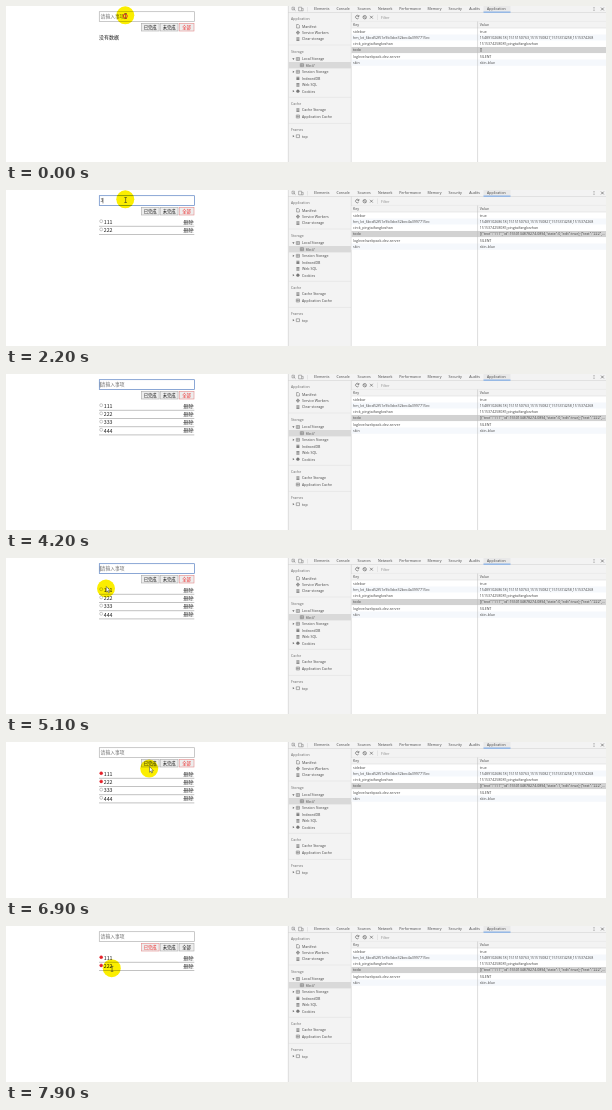
Recreate the animation shown at these times as an HTML page. Size 600 by 156 pixels, loop 8000 ms.

```html
<!DOCTYPE html>
<html lang="zh">
<head>
<meta charset="utf-8">
<title>Todo list with local storage</title>
<style>
  html, body { margin: 0; width: 100%; height: 100%; overflow: hidden; background: #fff; }
  svg { display: block; width: 100%; height: 100%; }
  text { white-space: pre; }
  .ui { font-family: "Open Sans", "Noto Sans", sans-serif; font-size: 3.6px; fill: #444; }
  .page { font-family: "Noto Sans CJK SC", "Noto Sans CJK", sans-serif; font-size: 5px; fill: #222; }
  .glow { mix-blend-mode: multiply; }
</style>
</head>
<body>
<svg id="stage" viewBox="0 0 600 156"></svg>
<script>
const NS = "http://www.w3.org/2000/svg";
const LOOP = 8000, STEP = 100;
const stage = document.getElementById("stage");

function add(tag, attrs, parent = stage, content) {
  const el = document.createElementNS(NS, tag);
  set(el, attrs);
  if (content !== undefined) el.textContent = content;
  return parent.appendChild(el);
}
function set(el, attrs) {
  for (const k in attrs) el.setAttribute(k, attrs[k]);
}
const rect = (x, y, width, height, fill, more = {}, parent = stage) =>
  add("rect", { x, y, width, height, fill, ...more }, parent);
const path = (d, stroke, width = 0.5, parent = stage) =>
  add("path", { d, stroke, "stroke-width": width, fill: "none" }, parent);
const ui = (x, y, s, more = {}) => add("text", { class: "ui", x, y, ...more }, stage, s);
const page = (x, y, s, more = {}, parent = stage) =>
  add("text", { class: "page", x, y, ...more }, parent, s);
const show = (el, on) => el.setAttribute("visibility", on ? "inherit" : "hidden");

rect(0, 0, 600, 156, "#fff");

// Developer tools: tab bar and toolbar
rect(282, 0, 318, 15.5, "#f3f3f3");
rect(282, 6.5, 63, 149.5, "#f3f3f3");
path("M282.3 0V156M345.3 6.5V156", "#c4c4c4");
path("M282 6.5H600M345 15.4H600", "#cfcfcf");
path("M286 1.2h2.4v2.6h-2.4zM287.2 2.4l2.3 2.3M292.6 1.2h3v3.6h-3zM295.6 2.4h1.6v2.4h-1.6", "#777");
path("M301.5 1V5.5", "#ccc", 0.4);
rect(477.5, 0, 27, 6.3, "#e9e9e9");
rect(477.5, 5.7, 27, 0.8, "#4d90e8");
[["Elements", 308], ["Console", 330.4], ["Sources", 351.5], ["Network", 372], ["Performance", 393.2],
 ["Memory", 421.5], ["Security", 442.5], ["Audits", 463.3], ["Application", 481]]
  .forEach(([s, x]) => ui(x, 4.1, s));
path("M588 1.1v.8M588 2.6v.8M588 4.1v.8M595 1.6l2.8 2.8M597.8 1.6l-2.8 2.8", "#666", 0.7);
path("M352.6 10a1.7 1.7 0 1 0 .2 1.8M352.9 9v1.5h-1.5", "#555", 0.6);
path("M357 11.2a1.7 1.7 0 1 0 3.4 0a1.7 1.7 0 1 0-3.4 0M357.6 10l2.2 2.4", "#555", 0.6);
path("M364 9.8l2.8 2.8M366.8 9.8l-2.8 2.8", "#555", 0.6);
path("M371.5 8.5V14", "#ccc", 0.4);
ui(375, 12.6, "Filter", { style: "fill:#888" });

// Sidebar
rect(282.6, 56, 62.4, 6.4, "#d9d9d9");
path("M282.6 39H345M282.6 91.3H345M282.6 117.4H345", "#d4d4d4", 0.4);
const heading = (y, s) => ui(285, y + 1.3, s, { style: "fill:#6a6a6a" });
heading(13, "Application");
heading(45.5, "Storage");
heading(97.5, "Cache");
heading(123.5, "Frames");
const cylinder = y => {
  for (const dy of [-1.5, -0.3, 0.9]) rect(290.4, y + dy, 3, 0.8, "#666");
};
const grid = y => path(`M290.3 ${y - 1.5}h3.2v3h-3.2zM290.3 ${y}h3.2M291.9 ${y - 1.5}v3`, "#666", 0.45);
const doc = y => path(`M290.6 ${y - 1.7}h1.8l1 1v2.5h-2.8z`, "#666", 0.5);
const gear = y => path(`M290.6 ${y}a1.3 1.3 0 1 0 2.6 0a1.3 1.3 0 1 0-2.6 0M290 ${y}h3.8M291.9 ${y - 1.9}v3.8`, "#666", 0.5);
const cookie = y => add("circle", { cx: 291.9, cy: y, r: 1.6, fill: "#777" });
const openMark = y => add("path", { d: `M286.3 ${y - 0.7}h2.2l-1.1 1.6z`, fill: "#666" });
const closedMark = y => add("path", { d: `M286.8 ${y - 1.1}v2.2l1.6-1.1z`, fill: "#666" });
const frameIcon = y => path(`M290.3 ${y - 1.4}h3.2v2.8h-3.2z`, "#666", 0.5);
[["Manifest", 20.2, doc], ["Service Workers", 26.6, gear], ["Clear storage", 33, cylinder],
 ["Local Storage", 53, grid, openMark], ["Session Storage", 65.8, grid, closedMark],
 ["IndexedDB", 72.3, cylinder], ["Web SQL", 78.8, cylinder], ["Cookies", 85.2, cookie, closedMark],
 ["Cache Storage", 104, cylinder], ["Application Cache", 110.5, grid], ["top", 130.2, frameIcon, closedMark]]
  .forEach(([s, y, icon, mark]) => {
    icon(y);
    if (mark) mark(y);
    ui(296, y + 1.3, s);
  });
grid(59.2).setAttribute("transform", "translate(4 0)");
ui(300, 60.5, "file://");

// Storage table
rect(345.6, 15.6, 254.4, 6.4, "#f3f3f3");
ui(347, 20.3, "Key");
ui(473.8, 20.3, "Value");
const pairs = [
  ["sidebar", "true"],
  ["hm_lvt_6bcd52f51e9b3dce32bec4a3997715ec", "1548910268618|1515150763,1515150827,1515374258,1515374268"],
  ["circk_pingtaifangkezhan", "1515374258085;pingtaifangkezhan"],
  ["todo", "[]"],
  ["loglevel:webpack-dev-server", "SILENT"],
  ["skin", "skin-blue"]
];
const cells = pairs.map(([key, value], i) => {
  const y = 22.2 + i * 6.26;
  rect(345.6, y, 254.4, 6.26, key === "todo" ? "#d2d2d2" : i % 2 ? "#f5f8fc" : "#fff");
  ui(347, y + 4.4, key);
  return ui(473.8, y + 4.4, value);
});
path("M345.6 22H600", "#ccc", 0.4);
path("M471.6 15.5V156", "#bbb");
const stored = cells[3];

// Todo page
const box = rect(93.3, 5.7, 95.2, 9.8, "#fff", { "stroke-width": 0.7 });
const typed = page(94.6, 12.4, "", { style: "font-size:4.8px" });
const caret = path("M94.3 7.9V13.4", "#222", 0.5);

const buttons = [["已完成", 135.3, 17.8], ["未完成", 154.2, 17.8], ["全部", 173.2, 14.8]].map(([s, x, w]) => {
  const face = rect(x, 17.4, w, 7.6, "#ededed", { "stroke-width": 0.6 });
  const label = page(x + w / 2, 22.8, s, { "text-anchor": "middle", style: "font-size:4.3px" });
  return { face, label };
});
const empty = page(93, 33.3, "没有数据");

const rows = [0, 1, 2, 3].map(i => {
  const g = add("g", { transform: `translate(0 ${i * 8.2})` });
  const dot = add("circle", { cx: 95.2, cy: 31.2, r: 1.5, "stroke-width": 0.45 }, g);
  page(97.7, 34, String(i + 1).repeat(3), { style: "font-size:5.3px" }, g);
  page(177.4, 33.8, "删除", { style: "fill:#444" }, g);
  path("M177.2 32.1H187.6", "#555", 0.5, g);
  path("M93 36.3H188.3", "#999", 0.6, g);
  return { g, dot };
});

// Pointer with its highlight
const glow = add("circle", { class: "glow", r: 9, fill: "#fbee00" });
const pointer = add("g", {});
const arrow = add("path", { d: "M0-2v5.6l1.3-1.2l.9 2l.9-.4l-.9-1.9h1.7z", fill: "#fff", stroke: "#222", "stroke-width": 0.45 }, pointer);
const beam = path("M-1.3-1.8h2.6M0-1.8V3.2M-1.3 3.2h2.6", "#333", 0.6, pointer);
const ring = add("circle", { fill: "none", stroke: "#e8202a", "stroke-width": 0.9 });

// Typing: each burst lists its three key times and the Enter time
const bursts = [[600, 800, 900, 1200], [1400, 1600, 1700, 1900], [2200, 2400, 2500, 2700], [3300, 3600, 3700, 3900]];
const FOCUS = 100, BLUR = 5400, FILTER = 7200;
const presses = [FOCUS, ...bursts.flat()];
const doneAt = [5400, 6200];
const clicks = [0, 5300, 6100, 7100];

const track = [
  [0, 119.3, 9.3], [4000, 119.3, 9.3], [4100, 141.5, 9.3], [4500, 246, 12], [4800, 160, 22],
  [5100, 100, 30.5], [5300, 94, 31.5], [5500, 94, 32], [5900, 96.2, 40.5], [6100, 94, 41], [6300, 94, 42.5],
  [6600, 113, 37], [6900, 143.2, 26.6], [7100, 150, 22], [7300, 147, 23], [7800, 106, 42], [8000, 105.5, 42.3]
];
function pointerAt(t) {
  const i = track.findIndex(k => k[0] > t);
  const [t0, x0, y0] = track[i - 1], [t1, x1, y1] = track[i];
  const u = (t - t0) / (t1 - t0);
  return [x0 + (x1 - x0) * u, y0 + (y1 - y0) * u];
}

function caretOn(t) {
  const last = Math.max(...presses.filter(p => p <= t));
  return (t - last) % 1000 < 500;
}

function storedText(count, state) {
  if (!count) return "[]";
  const first = `[{"text":"111","id":1550134878274.0894,"state":${state},"edit":true}`;
  return first + (count > 1 ? ',{"text":"222",…' : "]");
}

function draw(ms) {
  const t = Math.floor(ms / STEP) * STEP;
  const count = bursts.filter(b => t >= b[3]).length;
  const keys = count < 4 ? bursts[count].slice(0, 3).filter(k => t >= k).length : 0;
  const focused = t >= FOCUS && t < BLUR;
  const filtered = t >= FILTER;

  box.setAttribute("stroke", focused ? "#5b82c4" : "#b3b3b3");
  typed.textContent = keys ? String(count + 1).repeat(keys) : "请输入事项";
  typed.style.fill = keys ? "#333" : "#757575";
  show(caret, focused && caretOn(t));
  caret.setAttribute("transform", `translate(${keys * 2.66} 0)`);

  buttons.forEach(({ face, label }, i) => {
    const on = i === (filtered ? 0 : 2);
    face.setAttribute("stroke", on ? "#e58a8a" : "#aaa");
    label.style.fill = on ? "#f02020" : "#111";
  });

  show(empty, !count);
  rows.forEach(({ g, dot }, i) => {
    const done = t >= doneAt[i];
    show(g, i < count && (!filtered || done));
    set(dot, { fill: done ? "#e5202a" : "#fff", stroke: done ? "#e5202a" : "#888" });
  });
  stored.textContent = storedText(count, t >= doneAt[0] ? 1 : 0);

  const [x, y] = pointerAt(t);
  const seen = t < 4200 || t >= 4500;
  set(glow, { cx: x, cy: y });
  show(glow, seen);
  show(pointer, seen);
  pointer.setAttribute("transform", `translate(${x + 0.3} ${y})`);
  const text = t < 4200 || t >= 7700;
  show(beam, text);
  show(arrow, !text);

  const hit = clicks.find(c => t >= c && t < c + 200);
  show(ring, hit !== undefined);
  if (hit !== undefined) set(ring, { cx: x, cy: y + 0.8, r: t === hit ? 2 : 11 });
}

function tick() {
  draw(performance.now() % LOOP);
  requestAnimationFrame(tick);
}
tick();
</script>
</body>
</html>
```
